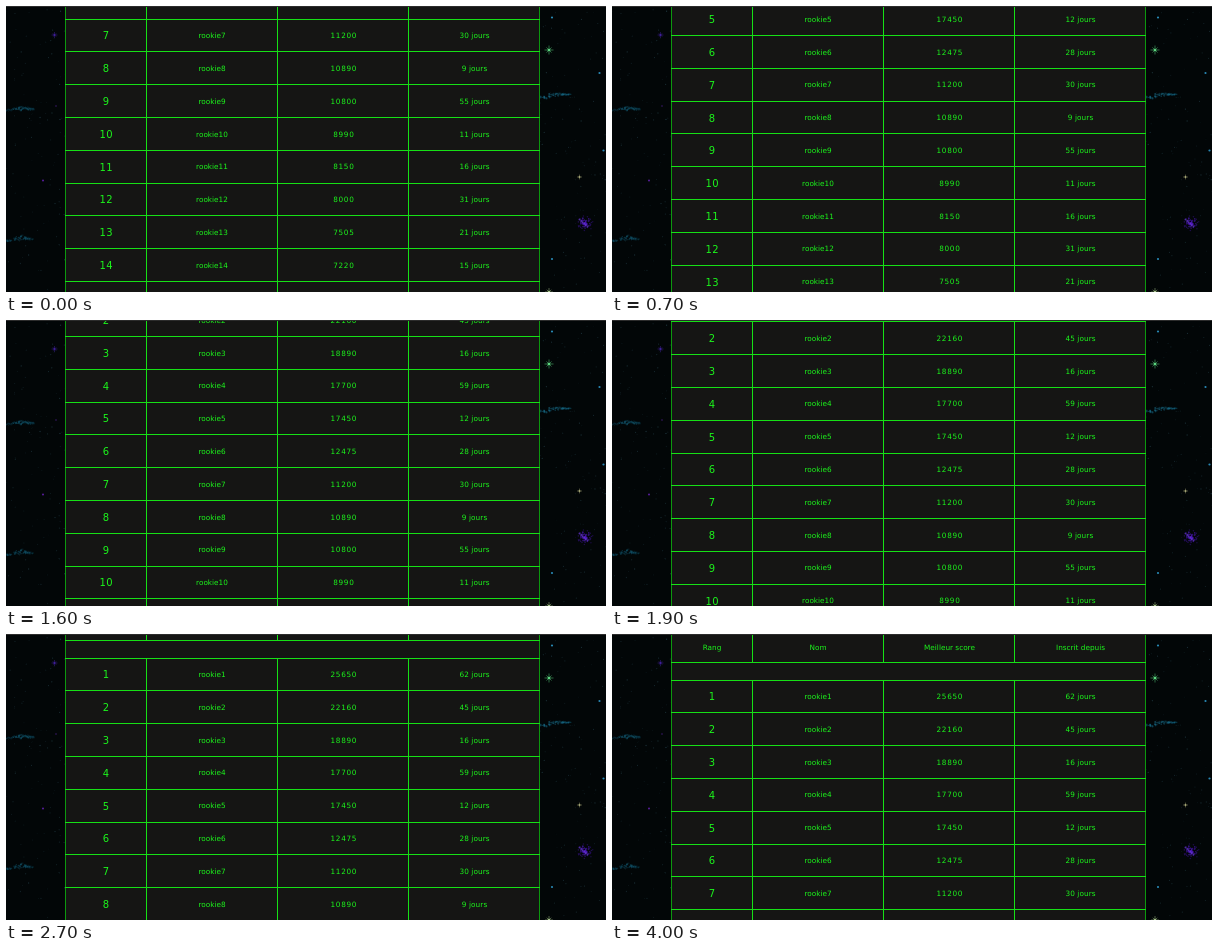
An HTML page with a canvas that plays this animation: 600 px wide and 286 px high, repeating every 5200 ms.

```html
<!DOCTYPE html>
<html lang="fr">
<head>
<meta charset="utf-8">
<title>Classement</title>
<style>
html, body { margin: 0; width: 100%; height: 100%; overflow: hidden; background: #020607; }
canvas { display: block; }
</style>
</head>
<body>
<canvas id="stage" width="600" height="286"></canvas>
<script>
const W = 600, H = 286, LOOP = 5200, STEP = 100;
const ROW = 32.8, BAND = 17.3;
const EDGES = [59, 140, 271, 402, 533];
const CENTERS = [100, 206, 337.5, 468.5];
const HEADS = ['Rang', 'Nom', 'Meilleur score', 'Inscrit depuis'];
const SCORES = [25650, 22160, 18890, 17700, 17450, 12475, 11200,
  10890, 10800, 8990, 8150, 8000, 7505, 7220];
const DAYS = [62, 45, 16, 59, 12, 28, 30, 9, 55, 11, 16, 31, 21, 15];
const FONT = '"DejaVu Sans", sans-serif';
const TEXT = '#1cf41c', LINE = '#16e016', SIDE = '#0c980e';

// Scroll keys: time, top of the first row
const KEYS = [[0, -183.7], [700, -134.4], [1200, -76.2], [1900, -31],
  [2400, 2], [3000, 39.6], [3500, 46]];

const ctx = document.getElementById('stage').getContext('2d');

function slope(i) {
  if (i === 0) return 0.06;
  if (i === KEYS.length - 1) return 0;
  const rate = k => (KEYS[k + 1][1] - KEYS[k][1]) / (KEYS[k + 1][0] - KEYS[k][0]);
  const a = rate(i - 1), b = rate(i);
  return 2 * a * b / (a + b);
}

function scrollAt(t) {
  const i = KEYS.findIndex(k => k[0] > t) - 1;
  if (i < 0) return KEYS[KEYS.length - 1][1];
  const [t0, y0] = KEYS[i], [t1, y1] = KEYS[i + 1];
  const d = t1 - t0, u = (t - t0) / d, v = 1 - u;
  return v * v * (1 + 2 * u) * y0 + u * u * (3 - 2 * u) * y1
    + d * u * v * (v * slope(i) - u * slope(i + 1));
}

function random(seed) {
  return () => (seed = (seed * 16807) % 2147483647) / 2147483647;
}

function dot(c, x, y, r, color, alpha = 1) {
  c.globalAlpha = alpha;
  c.fillStyle = color;
  c.beginPath();
  c.arc(x, y, r, 0, Math.PI * 2);
  c.fill();
  c.globalAlpha = 1;
}

function star(c, x, y, r, color, rays = 4) {
  c.strokeStyle = color;
  c.lineWidth = 0.8;
  c.globalAlpha = 0.6;
  c.beginPath();
  for (let i = 0; i < rays; i++) {
    const a = i * 2 * Math.PI / rays, len = i % 2 && rays > 4 ? r * 0.8 : r;
    c.moveTo(x, y);
    c.lineTo(x + len * Math.cos(a), y + len * Math.sin(a));
  }
  c.stroke();
  dot(c, x, y, Math.max(0.9, r * 0.3), color);
}

// A wispy streak, densest at the point `core` along its length
function dust(c, x, y, width, rise, core, color, rnd) {
  for (let i = 0; i < 110; i++) {
    const u = rnd(), near = 1 - Math.abs(u - core);
    const py = y - rise * u + Math.sin(u * 8) * 0.8 + (rnd() + rnd() - 1) * 3.4 * near * near;
    dot(c, x + u * width, py, 0.5 + rnd() * 0.6, color, 0.1 + rnd() * 0.5 * near);
  }
}

function makeSky() {
  const sky = document.createElement('canvas');
  sky.width = W;
  sky.height = H;
  const c = sky.getContext('2d'), rnd = random(71);
  c.fillStyle = '#020607';
  c.fillRect(0, 0, W, H);
  for (let i = 0; i < 200; i++) {
    const x = i % 2 ? rnd() * 59 : 534 + rnd() * 66;
    dot(c, x, rnd() * H, 0.35 + rnd() * 0.35, '#2e505c', 0.2 + rnd() * 0.4);
  }
  dust(c, -4, 104, 32, 2, 0.6, '#14546a', rnd);
  dust(c, -4, 234, 32, 2, 0.6, '#14546a', rnd);
  dust(c, 531, 91.5, 34, 4, 0.35, '#1c6e8a', rnd);

  star(c, 48.5, 29, 3, '#40209c', 8);
  dot(c, 37, 174.5, 1, '#5a1ea0');
  dot(c, 50, 100, 0.8, '#3c1a70');
  star(c, 543, 44, 4.5, '#5cd880', 8);
  star(c, 543, 286, 4, '#a8c88c', 8);
  star(c, 573.5, 171, 2.4, '#a8a878');
  for (const [x, y] of [[546, 11.5], [593.5, 67], [597.5, 144.5], [546, 253]])
    dot(c, x, y, 1.1, '#2888b4');

  for (let i = 0; i < 70; i++) {
    const a = rnd() * Math.PI * 2, r = rnd() * 8;
    dot(c, 579 + r * Math.cos(a), 217.5 + r * Math.sin(a), 0.8, '#4a18b0', 0.8 - r * 0.06);
  }
  for (let u = -1; u <= 1; u += 0.4)
    dot(c, 577.5 + u * 4, 217 + u * 3.5, 1, '#6a38d8', 0.7);
  return sky;
}

const sky = makeSky();

function hline(y) {
  ctx.fillStyle = LINE;
  ctx.fillRect(EDGES[0], Math.floor(y), EDGES[4] - EDGES[0] + 1, 1);
}

function vline(x, top, bottom, color) {
  ctx.fillStyle = color;
  ctx.fillRect(x, top, 1, bottom - top);
}

function label(text, x, y, size, spacing = 0) {
  ctx.font = `${size}px ${FONT}`;
  ctx.letterSpacing = spacing + 'px';
  ctx.fillText(text, x + spacing / 2, y + size * 0.365);
}

function draw(t) {
  const top = scrollAt(t), headLine = top - BAND;
  ctx.drawImage(sky, 0, 0);
  ctx.fillStyle = '#151514';
  ctx.fillRect(EDGES[0], 0, EDGES[4] - EDGES[0], H);

  for (const x of EDGES.slice(1, 4)) {
    vline(x, 0, Math.max(0, Math.floor(headLine)), LINE);
    vline(x, Math.max(0, Math.floor(top)), H, LINE);
  }
  vline(EDGES[0], 0, H, SIDE);
  vline(EDGES[4], 0, H, SIDE);
  hline(headLine);
  for (let i = 0; i <= 15; i++) hline(top + i * ROW);

  ctx.fillStyle = TEXT;
  ctx.textAlign = 'center';
  HEADS.forEach((text, i) => label(text, CENTERS[i], headLine - 15.5, 7.3));
  SCORES.forEach((score, i) => {
    const y = top + (i + 0.5) * ROW;
    label(i + 1, CENTERS[0], y + 0.3, 10, 0.4);
    label('rookie' + (i + 1), CENTERS[1], y, 7.3);
    label(score, CENTERS[2], y, 7.3, 0.7);
    label(DAYS[i] + ' jours', CENTERS[3], y, 7.3, 0.1);
  });

  ctx.fillStyle = '#2c2c2c';
  ctx.fillRect(0, 0, W, 1);
}

const start = performance.now();
function tick() {
  const t = (performance.now() - start) % LOOP;
  draw(Math.floor(t / STEP) * STEP);
  requestAnimationFrame(tick);
}
tick();
</script>
</body>
</html>
```
